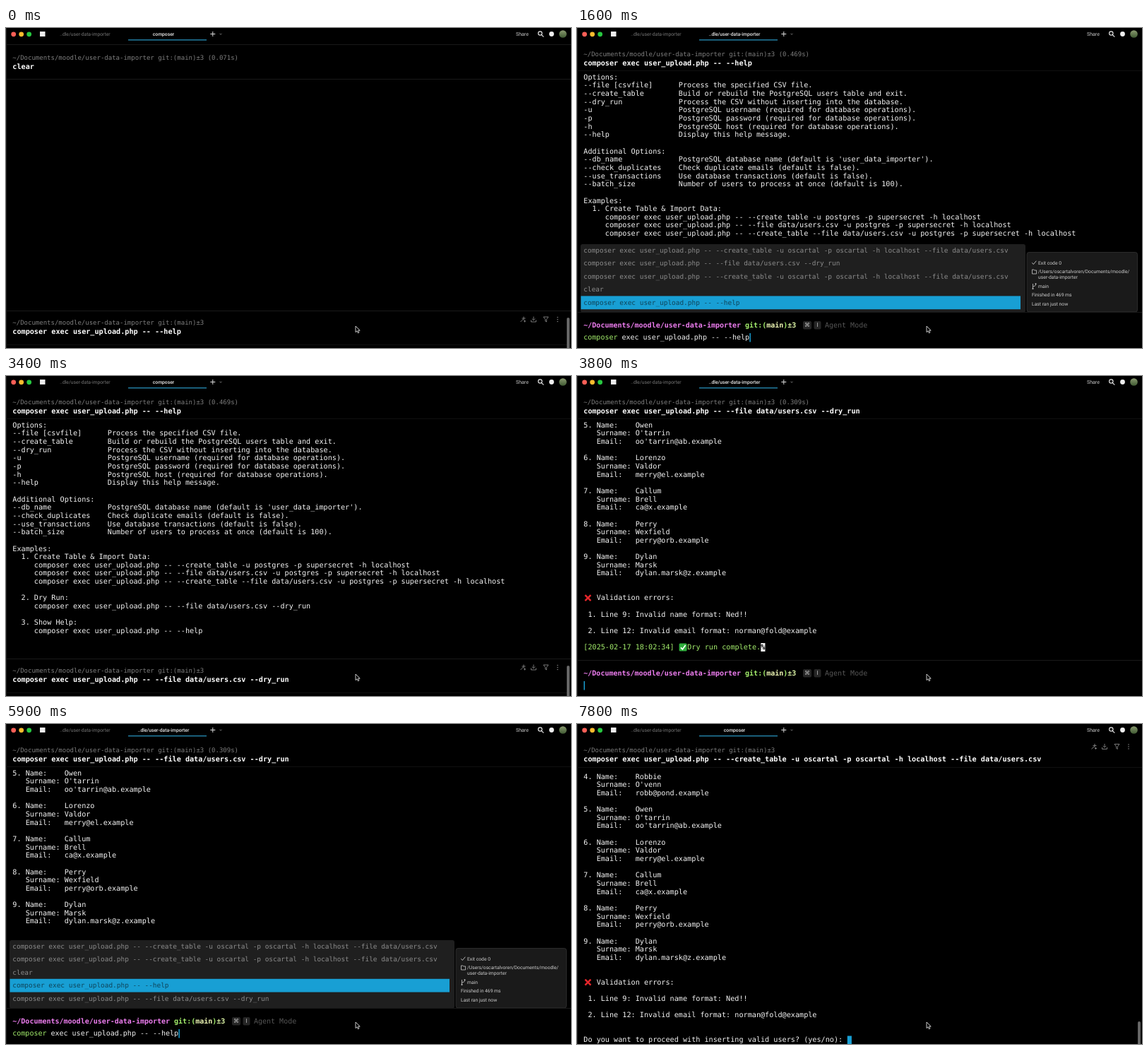
These frames come from a looping animation (800 by 453 pixels, 8000 ms). An HTML page:

```html
<!DOCTYPE html>
<html lang="en">
<head>
<meta charset="utf-8">
<title>Terminal session</title>
<style>
html, body { margin: 0; width: 100%; height: 100%; overflow: hidden; background: #000; }
svg { display: block; width: 100%; height: 100%; }
text { white-space: pre; font-family: "DejaVu Sans Mono", monospace; text-rendering: geometricPrecision; }
.ui { font-family: Roboto, sans-serif; }
</style>
</head>
<body>
<svg id="stage" viewBox="0 0 800 453"></svg>
<script>
const LOOP = 8000, LEFT = 9.3, ROW = 11.65;
const OUT = 10.17, INPUT = 10, PATH = 9, LIST = 9.43;
const CELL = OUT * 0.602;
const WHITE = '#f4f4f4', GRAY = '#7d7d7d', GREEN = '#a4ee6c', BLUE = '#189fd4';

const USER = 'oscartal';
const BASE = 'composer exec user_upload.php -- ';
const HELP = BASE + '--help';
const DRY = BASE + '--file data/users.csv --dry_run';
const CREATE = BASE + `--create_table -u ${USER} -p ${USER} -h localhost --file data/users.csv`;
const CWD = '~/Documents/moodle/user-data-importer';
const TAB = '..dle/user-data-importer';

// [start, scene, selected history row, running command]
const steps = [
  [0, 'clear', -1, HELP],
  [500, 'help', -1],
  [1500, 'help', 4], [1750, 'help', 3], [1950, 'help', 2], [2100, 'help', 1],
  [3300, 'help', -1, DRY],
  [3600, 'dry', -1],
  [5200, 'dry', 4], [5700, 'dry', 3], [5950, 'dry', 2], [6200, 'dry', 1],
  [7500, 'dry', -1, CREATE],
  [7700, 'insert', -1, CREATE]
];

const histories = {
  help: [[CREATE, '4.08 sec'], [DRY, '363 ms'], [CREATE, '4.08 sec'], ['clear', '71 ms'], [HELP, '469 ms']],
  dry: [[CREATE, '4.08 sec'], [CREATE, '4.08 sec'], ['clear', '71 ms'], [HELP, '469 ms'], [DRY, '309 ms']]
};

const option = ([name, about]) => name.padEnd(22) + about;
const helpLines = [
  'Options:',
  ...[
    ['--file [csvfile]', 'Process the specified CSV file.'],
    ['--create_table', 'Build or rebuild the PostgreSQL users table and exit.'],
    ['--dry_run', 'Process the CSV without inserting into the database.'],
    ['-u', 'PostgreSQL username (required for database operations).'],
    ['-p', 'PostgreSQL password (required for database operations).'],
    ['-h', 'PostgreSQL host (required for database operations).'],
    ['--help', 'Display this help message.']
  ].map(option),
  '', 'Additional Options:',
  ...[
    ['--db_name', "PostgreSQL database name (default is 'user_data_importer')."],
    ['--check_duplicates', 'Check duplicate emails (default is false).'],
    ['--use_transactions', 'Use database transactions (default is false).'],
    ['--batch_size', 'Number of users to process at once (default is 100).']
  ].map(option),
  '', 'Examples:',
  '  1. Create Table & Import Data:',
  '     ' + BASE + '--create_table -u postgres -p supersecret -h localhost',
  '     ' + BASE + '--file data/users.csv -u postgres -p supersecret -h localhost',
  '     ' + BASE + '--create_table --file data/users.csv -u postgres -p supersecret -h localhost',
  '', '  2. Dry Run:', '     ' + DRY,
  '', '  3. Show Help:', '     ' + HELP
];

const users = [
  ['Robbie', "O'venn", 'robb@pond.example'],
  ['Owen', "O'tarrin", "oo'tarrin@ab.example"],
  ['Lorenzo', 'Valdor', 'merry@el.example'],
  ['Callum', 'Brell', 'ca@x.example'],
  ['Perry', 'Wexfield', 'perry@orb.example'],
  ['Dylan', 'Marsk', 'dylan.marsk@z.example']
];
const userLines = first => users.slice(first - 4).flatMap(([name, surname, email], i) => [
  `${first + i}. Name:    ${name}`, `   Surname: ${surname}`, `   Email:   ${email}`, ''
]);
const errorLines = [
  '', '   Validation errors:', '',
  ' 1. Line 9: Invalid name format: Ned!!', '',
  ' 2. Line 12: Invalid email format: norman@fold@example'
];

const esc = s => s.replace(/&/g, '&amp;').replace(/</g, '&lt;');
const rect = (x, y, w, h, fill, more = '') => `<rect x="${x}" y="${y}" width="${w}" height="${h}" fill="${fill}" ${more}/>`;
const circle = (x, y, r, fill) => `<circle cx="${x}" cy="${y}" r="${r}" fill="${fill}"/>`;
const stroke = (d, color, width = 1) => `<path d="${d}" fill="none" stroke="${color}" stroke-width="${width}"/>`;
const rule = (y, color = '#191919') => rect(0, y, 800, 1, color);

// Text is placed by the middle of its capitals; parts are [string, colour].
function text(x, mid, parts, size, fill = WHITE, more = '') {
  const body = typeof parts === 'string' ? esc(parts)
    : parts.map(([s, c]) => `<tspan fill="${c}">${esc(s)}</tspan>`).join('');
  return `<text x="${x}" y="${mid + size * 0.32}" font-size="${size}" fill="${fill}" ${more}>${body}</text>`;
}
const bold = 'font-weight="700"';
const ui = (x, mid, s, fill, more = '', size = 6.75) => text(x, mid, s, size, fill, 'class="ui" ' + more);
const rows = (lines, top) => lines.map((s, i) => s && text(LEFT, top + i * ROW, s, OUT)).join('');

function chrome(title) {
  return rect(0, 0, 1, 453, '#1c1c1c')
    + ['#ff5f57', '#febc2e', '#28c840'].map((c, i) => circle(10.7 + i * 11, 8.8, 3.4, c)).join('')
    + rect(48, 5, 7.5, 7, '#eee')
    + ui(112, 8.5, TAB, '#777', 'text-anchor="middle"')
    + ui(223, 8.5, title, '#eee', 'text-anchor="middle" font-weight="500"')
    + rect(173, 16.2, 111, 1.4, '#2586ad')
    + stroke('M289.3 8.5h7M292.8 5v7', '#ddd')
    + stroke('M302.5 7.8l1.5 1.5 1.5-1.5', '#999', 0.8)
    + ui(722, 8.6, 'Share', '#ccc', '', 7)
    + stroke('M759 7.6a2.7 2.7 0 1 0-5.4 0a2.7 2.7 0 1 0 5.4 0M758.3 9.6l3 3', '#eee', 1.1)
    + circle(772.5, 8.5, 3.4, '#eee')
    + circle(788.5, 8.5, 5.3, 'url(#avatar)');
}

const defs = `<defs><linearGradient id="avatar" x2="0" y2="1">
  <stop stop-color="#8a9a70"/><stop offset="1" stop-color="#3f5a32"/></linearGradient></defs>`;

const blockHead = (y, command, time = '') =>
  text(LEFT, y, `${CWD} git:(main)±3${time}`, PATH, GRAY) + text(LEFT, y + 12.6, command, OUT, '#fff', bold);

const blockTools = y => `<g transform="translate(0 ${y})">`
  + stroke('M728.5 3.5l4-4M733-4v5M730.5-1.5h5M734.5 1v3M733 2.5h3', '#858585', 0.9)
  + stroke('M747-4v5M744.8-1l2.2 2.2L749.2-1M743.5 1v2.5h7V1', '#858585', 0.9)
  + stroke('M761-3.5h7l-2.7 3.6v3.4l-1.6-1v-2.4z', '#858585', 0.9)
  + [-3, 0, 3].map(d => circle(781, d, 0.7, '#999')).join('') + '</g>';

const scrollbar = y => rect(794, y, 4, 460 - y, '#666', 'rx="2"');

const cross = y => stroke(`M11.5 ${y - 4}l8 8M19.5 ${y - 4}l-8 8`, '#e6262b', 2.4);

const scenes = {
  clear: () => rule(23) + blockHead(42, 'clear', ' (0.071s)') + rule(72),
  help: () => blockHead(37, HELP, ' (0.469s)') + rule(60, '#101010') + rows(helpLines, 69.5),
  dry() {
    const y = 69.5 + 27 * ROW, check = LEFT + 22 * CELL, mark = LEFT + 41 * CELL;
    return blockHead(37, DRY, ' (0.309s)') + rule(60, '#101010')
      + rows([...userLines(5), ...errorLines], 69.5)
      + cross(69.5 + 21 * ROW)
      + text(LEFT, y, '[2025-02-17 18:02:34]', OUT, GREEN)
      + rect(check + 0.6, y - 5.5, 11, 11, '#2fae3c', 'rx="1.5"')
      + stroke(`M${check + 3} ${y + 0.3}l2.4 2.6 4.2-6`, '#fff', 1.7)
      + text(LEFT + 24 * CELL, y, 'Dry run complete.', OUT, GREEN)
      + rect(mark, y - 6, CELL, 12, '#f0f0f0') + text(mark, y, '%', OUT, '#000', bold);
  },
  insert() {
    const question = 'Do you want to proceed with inserting valid users? (yes/no): ';
    return blockHead(37, CREATE) + blockTools(32) + rule(61, '#101010')
      + rows([...userLines(4), ...errorLines, '', '', question], 74.3)
      + cross(74.3 + 25 * ROW)
      + rect(LEFT + question.length * CELL, 441.5, CELL, 11.5, BLUE) + scrollbar(421);
  }
};

const runningBlock = command => rule(400) + blockHead(417, command) + blockTools(412.5) + rule(448, '#101010') + scrollbar(410);

function prompt(command, caret) {
  const tokens = command.split(/(^composer|data\/users\.csv)/).filter(Boolean)
    .map(s => [s, s === 'composer' ? GREEN : s.startsWith('data/') ? '#d2bdf8' : WHITE]);
  const key = (x, w, s) => rect(x, 415, w, 11.5, '#262626', 'rx="2"')
    + text(x + w / 2, 420.9, s, 8, '#bbb', 'text-anchor="middle" style="font-family:\'DejaVu Sans\',sans-serif"');
  return rule(402)
    + text(LEFT, 420.5, [[CWD + ' ', '#ee7df0'], ['git:(', GREEN], ['main', '#eef7b4'], [')', GREEN], ['±3', '#dcf5a6']], INPUT, WHITE, bold)
    + key(320, 12, '⌘') + key(335.5, 10, 'I')
    + text(351, 420.5, 'Agent Mode', INPUT, '#555')
    + (command ? text(LEFT, 438, tokens, INPUT) : '')
    + (caret ? rect(LEFT + command.length * INPUT * 0.602 + 0.3, 432, 1.5, 12.5, BLUE) : '');
}

function historyPanel(list, selected) {
  const items = list.map(([command], i) => {
    const y = 314.6 + i * 18.6, on = i === selected;
    return (on ? rect(5.5, y - 9.6, 622.5, 18.8, BLUE) : '') + text(LEFT, y, command, LIST, on ? '#0f4459' : '#8b8b8b');
  }).join('');
  const line = (x, y, s) => ui(x, y, s, '#ccc');
  return rect(5, 306, 630, 96.5, '#1f1f1f', 'rx="3"') + items
    + rect(637, 317.5, 156.5, 84.5, '#1a1a1a', 'rx="3" stroke="#333" stroke-width=".8"')
    + stroke('M644.3 332.3l2 2.2 4-4.8', '#ccc', 0.9)
    + line(653, 332.5, 'Exit code 0')
    + stroke('M644.5 342h2.3l.8 1h3v5h-6.1z', '#ccc', 0.8)
    + line(653, 345, `/Users/${USER}voren/Documents/moodle/`) + line(653, 353.2, 'user-data-importer')
    + stroke('M645.5 362v7M649.5 362v1.5q0 2-4 2.5', '#ccc', 0.8) + circle(649.5, 362.3, 1, '#ccc') + circle(645.5, 369, 1, '#ccc')
    + line(653, 366, 'main')
    + line(644, 378.2, 'Finished in ' + list[selected][1]) + line(644, 390.8, 'Last ran just now');
}

const pointer = `<path d="M495 422v8.6l2-1.8 1.4 3 1.5-.7-1.4-2.9h2.7z" fill="#000" stroke="#ddd" stroke-width=".9"/>`;

function draw([, scene, selected, running], caret) {
  const list = histories[scene], open = selected >= 0;
  let footer = '';
  if (!running) footer = (open ? historyPanel(list, selected) : '') + prompt(open ? list[selected][0] : '', caret);
  else if (scene !== 'insert') footer = runningBlock(running);
  return defs + rect(0, 0, 800, 453, '#000') + chrome(running ? 'composer' : TAB) + scenes[scene]() + footer + pointer;
}

const stage = document.getElementById('stage');
let shown = '';
function tick() {
  const t = performance.now() % LOOP;
  const index = steps.findLastIndex(([start]) => t >= start);
  const caret = (t - steps[index][0]) % 1000 < 500;
  const state = `${index} ${caret}`;
  if (state !== shown) {
    shown = state;
    stage.innerHTML = draw(steps[index], caret);
  }
  requestAnimationFrame(tick);
}
tick();
</script>
</body>
</html>
```
